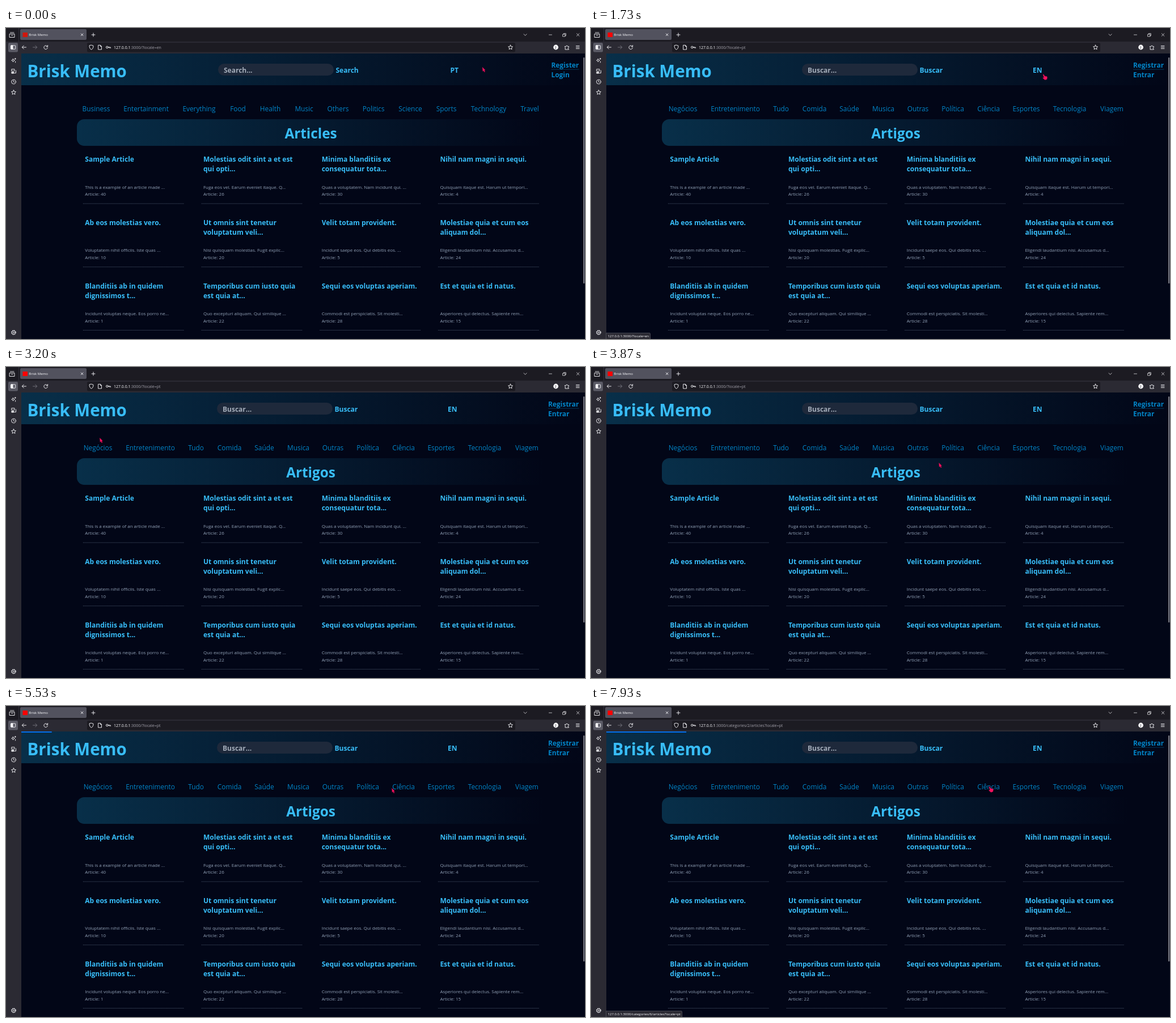
Recreate the animation shown at these times as an HTML page. Size 1021 px wide and 549 px high, loop 8 s.

```html
<!DOCTYPE html>
<html lang="en">
<head>
<meta charset="utf-8">
<title>Brisk Memo</title>
<style>
  html, body { margin: 0; width: 100%; height: 100%; overflow: hidden; background: #020617; }
  svg { display: block; width: 1021px; height: 549px; font-family: "Open Sans", "Noto Sans", sans-serif; }
  .icon { fill: none; stroke: #fbfbfe; stroke-width: .9; stroke-linecap: round; stroke-linejoin: round; }
  .bold { font-weight: 700; font-size: 12px; fill: #38bdf8; }
  .link { font-size: 11.85px; fill: #0284c7; }
  .auth { font-weight: 700; font-size: 11.9px; fill: #0284c7; }
  .small { font-size: 7.97px; fill: #94a3b8; }
  .url { font-size: 6.98px; fill: #a3a2ab; }
  .chrome { font-size: 6.04px; fill: #fbfbfe; }
</style>
</head>
<body>
<svg id="stage" viewBox="0 0 1021 549">
  <defs>
    <linearGradient id="fade"><stop stop-color="#082f49"/><stop offset="1" stop-color="#020617"/></linearGradient>
  </defs>
  <rect width="1021" height="549" fill="#2b2a33"/>
  <rect width="1021" height="24" fill="#1c1b22"/>
  <path d="M22.5 0V24" stroke="#3a3944" stroke-width=".7"/>
  <rect x="25" y="2" width="117" height="19" rx="2.2" fill="#52525e"/>
  <rect id="favicon" x="29.5" y="8" width="8.5" height="8"/>
  <rect x="4" y="26" width="17" height="16.5" rx="2.2" fill="#5b5b66"/>
  <rect x="143" y="26" width="755" height="16.5" rx="2.2" fill="#1c1b22"/>
  <rect x="27" y="45" width="994" height="504" fill="#020617"/>
  <rect x="27" y="45" width="994" height="56" fill="url(#fade)"/>
  <path d="M949 161H138A13 13 0 0 0 125 174V195A13 13 0 0 0 138 208H949Z" fill="url(#fade)"/>
  <rect x="1018" y="52" width="2.2" height="399" rx="1" fill="#7b7b85"/>

  <g class="icon">
    <path d="M7.5 8H14M6.5 10.5H15V16.5H6.5ZM9.5 13H12"/>
    <path d="M132.3 10L135.9 13.6M135.9 10L132.3 13.6M151 12H157M154 9V15"/>
    <path d="M913 10.8L915.6 13.3 918.2 10.8M957.5 12H962.5M1006.3 9.7L1010.9 14.3M1010.9 9.7L1006.3 14.3" stroke-width=".7"/>
    <path d="M982 11H986V15H982ZM983.3 11V9.7H987.3V13.7H986" stroke-width=".7"/>
    <rect x="8.7" y="30.8" width="8" height="6.5" rx="1"/>
    <path d="M9 31H12V37H9Z" fill="#fbfbfe"/>
    <path d="M35.5 34H28.5M31.3 31L28.3 34 31.3 37"/>
    <path d="M47.5 34H54.5M51.7 31L54.7 34 51.7 37" stroke="#77767f"/>
    <path d="M72.8 32.2A3.3 3.3 0 1 0 73.4 35M73.6 30.6V33H71"/>
    <path d="M150.5 30.2L154 31.3C154 35 153 36.8 150.5 38.2 148 36.8 147 35 147 31.3Z"/>
    <path d="M163 30.3H166.5L168.5 32.3V38H163ZM166.3 30.5V32.6H168.3"/>
    <circle cx="178.3" cy="34" r="1.8"/><path d="M180.2 34H184.3V35.6M182.3 34V35.3"/>
    <path d="M985.8 32.5H987.7A1.3 1.3 0 0 1 990.3 32.5H992.3V34.5A1.2 1.2 0 0 0 992.3 37V38H986V36A1.2 1.2 0 0 0 986 34.1Z"/>
    <path d="M1005.3 31.6H1011M1005.3 34H1011M1005.3 36.4H1011"/>
    <path d="M12.5 54.5L13.4 56.3 15.3 57.2 13.4 58.1 12.5 60 11.6 58.1 9.8 57.2 11.6 56.3ZM16.3 53.3V55.3M15.3 54.3H17.3M16.6 59V61"/>
    <path d="M10.2 72.7H15V76.2H10.2ZM10.3 79.5H17.5V75"/><path d="M10.2 78H13.5V80H10.2Z" fill="#fbfbfe"/>
    <circle cx="13.5" cy="95" r="3.8"/><path d="M13.5 92.8V95.2L15 96"/>
    <circle cx="13.5" cy="537.5" r="3.3"/><circle cx="13.5" cy="537.5" r="1.2"/>
    <circle cx="13.5" cy="537.5" r="4" stroke-dasharray="1.6 1.54" stroke-linecap="butt"/>
  </g>
  <g id="stars" class="icon"></g>
  <circle cx="969.6" cy="34" r="4.4" fill="#fbfbfe"/>
  <text x="969.6" y="36.3" font-size="6" font-weight="600" text-anchor="middle" fill="#2b2a33">J</text>
  <text class="chrome" x="40.3" y="14.3">Brisk Memo</text>
  <text class="url" x="190" y="36.9"><tspan fill="#fbfbfe">127.0.0.1</tspan><tspan id="path"></tspan></text>

  <text class="bold" x="37.5" y="87" style="font-size:29.5px">Brisk Memo</text>
  <g id="en"></g>
  <g id="pt"></g>
  <g id="cards"></g>
  <rect id="progress" x="27" y="45" height="1.8" fill="#0076ff"/>
  <g id="status">
    <path id="statusBox" fill="#2b2a33" stroke="#5b5b66" stroke-width=".7"/>
    <text id="statusText" class="chrome" x="29.5" y="546.3"></text>
  </g>
  <g id="cursor" fill="#f5125f" stroke="#7a0635" stroke-width=".35">
    <path id="arrow" d="M0 0L5.3 5.2 3.7 5.7 4.9 8.3 3.5 9 2.3 6.4.7 7.5Z"/>
    <path id="hand" d="M.2.6Q1.1-.5 2 .7L3.5 3.4 6.6 3.6Q8.1 4 8 5.6L7.4 9 3.8 10.1.3 7.2Q-.3 6 .9 5.7L2.1 6Z"/>
  </g>
</svg>
<script>
const LOOP = 8000;
const $ = id => document.getElementById(id);

function add(parent, tag, attrs, text) {
  const el = document.createElementNS("http://www.w3.org/2000/svg", tag);
  for (const key in attrs) el.setAttribute(key, attrs[key]);
  if (text) el.textContent = text;
  parent.appendChild(el);
  return el;
}
const label = (parent, cls, x, y, text, extra) =>
  add(parent, "text", { class: cls, x, y, ...extra }, text);

function star(cx, cy) {
  const points = Array.from({ length: 10 }, (_, i) => {
    const r = i % 2 ? 2 : 4.2, a = (i / 5 - .5) * Math.PI;
    return (cx + r * Math.cos(a)).toFixed(2) + "," + (cy + r * Math.sin(a)).toFixed(2);
  });
  add($("stars"), "polygon", { points: points.join(" ") });
}
star(889.6, 34.3);
star(13.5, 113.8);

const middle = { "text-anchor": "middle" };

// The parts of the page that depend on the language
function buildLocale(id, w) {
  const g = $(id);
  add(g, "rect", { x: w.inputX, y: 63, width: 204, height: 21, rx: 10.5, fill: "#1e293b" });
  label(g, "bold", w.inputX + 10, 79, w.search + "...", { style: "fill:#a3acb9" });
  label(g, "bold", w.inputX + 207.5, 78.7, w.search);
  label(g, "bold", w.switchX, 78.7, w.other);
  w.auth.forEach((s, i) => label(g, "auth", w.authX, 69.7 + i * 17.6, s));
  add(g, "path", { d: `M${w.authX} 73H1010.5`, stroke: "#075985", "stroke-width": .6 });
  w.nav.forEach(([s, x]) => label(g, "link", x, 147, s, middle));
  label(g, "bold", 537.6, 194.6, w.heading, { ...middle, style: "font-size:24.3px" });
}
buildLocale("en", {
  inputX: 374, search: "Search", other: "PT", switchX: 783.5,
  auth: ["Register", "Login"], authX: 961.5, heading: "Articles",
  nav: [["Business", 159], ["Entertainment", 247], ["Everything", 340.5], ["Food", 409],
    ["Health", 466], ["Music", 525.5], ["Others", 585.5], ["Politics", 648],
    ["Science", 713], ["Sports", 776.5], ["Technology", 851], ["Travel", 923.5]]
});
buildLocale("pt", {
  inputX: 372, search: "Buscar", other: "EN", switchX: 779,
  auth: ["Registrar", "Entrar"], authX: 956, heading: "Artigos",
  nav: [["Negócios", 162], ["Entretenimento", 254.5], ["Tudo", 335], ["Comida", 394],
    ["Saúde", 455.5], ["Musica", 515.5], ["Outras", 576.5], ["Política", 638],
    ["Ciência", 701], ["Esportes", 767.5], ["Tecnologia", 844], ["Viagem", 918.5]]
});

const articles = [
  ["Sample Article", "This is a example of an article made ...", 40],
  ["Molestias odit sint a et est|qui opti...", "Fuga eos vel. Earum eveniet itaque. Q...", 26],
  ["Minima blanditiis ex|consequatur tota...", "Quas a voluptatem. Nam incidunt qui. ...", 30],
  ["Nihil nam magni in sequi.", "Quisquam itaque est. Harum ut tempori...", 4],
  ["Ab eos molestias vero.", "Voluptatem nihil officiis. Iste quas ...", 10],
  ["Ut omnis sint tenetur|voluptatum veli...", "Nisi quisquam molestias. Fugit explic...", 20],
  ["Velit totam provident.", "Incidunt saepe eos. Qui debitis eos. ...", 5],
  ["Molestiae quia et cum eos|aliquam dol...", "Eligendi laudantium nisi. Accusamus d...", 24],
  ["Blanditiis ab in quidem|dignissimos t...", "Incidunt voluptas neque. Eos porro ne...", 1],
  ["Temporibus cum iusto quia|est quia at...", "Quo excepturi aliquam. Qui similique ...", 22],
  ["Sequi eos voluptas aperiam.", "Commodi est perspiciatis. Sit molesti...", 28],
  ["Est et quia et id natus.", "Asperiores qui delectus. Sapiente rem...", 15]
];
articles.forEach(([title, intro, id], i) => {
  const g = $("cards"), x = 139.3 + i % 4 * 208.7, y = Math.floor(i / 4) * 111.75;
  title.split("|").forEach((s, n) => label(g, "bold", x, 236 + y + n * 17.1, s));
  label(g, "small", x, 283.5 + y, intro);
  label(g, "small", x, 296.3 + y, "Article: " + id);
  add(g, "path", { d: `M${x - 3.3} ${310 + y}h178`, stroke: "#64748b", "stroke-width": .8, "stroke-dasharray": "1 1.1" });
});

// Each key: time, then values
const cursorKeys = [
  [0, 840, 69], [70, 838, 69.5], [530, 787, 71.5], [620, 787, 71.5], [930, 789.7, 75.5],
  [1680, 789.7, 75.5], [1800, 806, 90], [2020, 913, 108], [2270, 848, 100], [2400, 848, 100],
  [2470, 782, 104], [2870, 430, 116], [3270, 110, 127], [3400, 105, 108], [3530, 205, 78],
  [3700, 420, 112], [3870, 613, 169], [4000, 661, 168], [4130, 657, 164], [4530, 648.6, 140.5],
  [4730, 648.6, 140.5], [4800, 648, 140.5], [5010, 648, 140.5], [5400, 672, 146],
  [5870, 701.5, 142.3]
];
const progressKeys = [
  [5370, 0], [5670, 100], [5870, 103], [6200, 110], [6530, 118], [6730, 124.3], [7130, 130.7],
  [7210, 130.7], [7330, 136], [7470, 136], [7530, 137], [7610, 137], [7670, 138], [7810, 138], [7930, 141]
];
function sample(keys, t) {
  const n = keys.findIndex(k => k[0] > t);
  if (n < 0) return keys[keys.length - 1].slice(1);
  if (n === 0) return keys[0].slice(1);
  const a = keys[n - 1], b = keys[n], p = (t - a[0]) / (b[0] - a[0]);
  return a.slice(1).map((v, i) => v + (b[i + 1] - v) * p);
}

// Link under the pointer: start, end, query, box edge
const hovers = [
  [730, 1270, "/?locale=pt", 103.5],
  [1270, 1800, "/?locale=en", 104.5],
  [4330, 5260, "/categories/2/articles?locale=pt", 160.5],
  [5560, LOOP, "/categories/6/articles?locale=pt", 160.5]
];

const show = (id, on) => $(id).setAttribute("display", on ? "inline" : "none");

function draw(t) {
  const portuguese = t >= 1270;
  show("en", !portuguese);
  show("pt", portuguese);
  $("favicon").setAttribute("fill", t < 1130 ? "#d0160c" : "#ff0000");
  $("path").textContent = ":3000" + (t >= 7870 ? "/categories/2/articles?locale=pt"
    : portuguese ? "/?locale=pt" : "/?locale=en");

  const hover = hovers.find(h => t >= h[0] && t < h[1]);
  show("status", hover);
  show("hand", hover);
  show("arrow", !hover);
  if (hover) {
    $("statusText").textContent = "127.0.0.1:3000" + hover[2];
    $("statusBox").setAttribute("d", `M26.6 538.4H${hover[3] - 1.5}q1.5 0 1.5 1.5V550H26.6Z`);
  }
  $("cursor").setAttribute("transform", `translate(${sample(cursorKeys, t)})`);
  $("progress").setAttribute("width", sample(progressKeys, t)[0]);
}

const start = performance.now();
function tick() {
  draw((performance.now() - start) % LOOP);
  requestAnimationFrame(tick);
}
tick();
</script>
</body>
</html>
```
